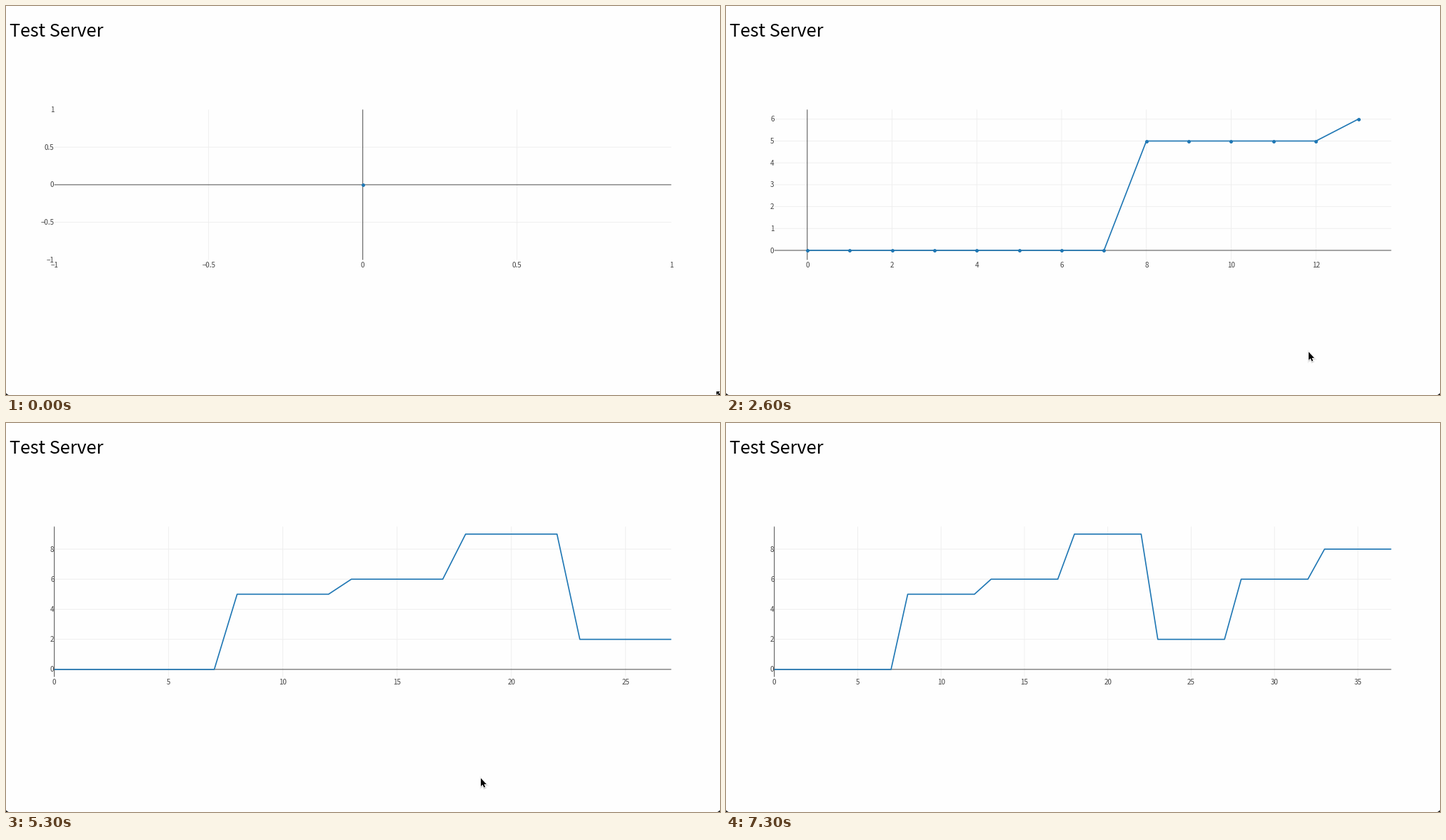
Animation of 1000x546 px, one loop 7400 ms. Source, as a matplotlib script:

```python
import math

import matplotlib.pyplot as plt
import numpy as np
from matplotlib.animation import FuncAnimation
from matplotlib.patches import Polygon

W, H, DPI = 1000, 546, 100
FRAMES, INTERVAL = 74, 100
PT = 72 / DPI
LEFT, RIGHT, TOP, BOTTOM = 67.7, 931.7, 145.4, 356.4
PAD_X, PAD_Y = 46.1, 13.4
BLUE, DARK, GRID, PAPER = "#1f77b4", "#444444", "#eeeeee", "#fefefe"
FONT = "Noto Sans CJK JP"

# The reading holds at 0 for eight samples, then changes every five.
VALUES = [0] * 8 + [v for v in (5, 6, 9, 2, 6, 8) for _ in range(5)]

# Pointer path: frame, x, y of the tip
PATH = np.array([
    (16, 989, 530), (18, 967.5, 508.5), (22, 905, 496), (26, 816, 485.5),
    (31, 668, 496.5), (36, 665.5, 496.5), (38, 665, 498.5), (62, 665, 498.5),
    (65, 662, 493), (67, 658, 475.8), (70, 656, 508),
])
ARROW = np.array([(0, 0), (0, 11.4), (2.6, 9.1), (4.4, 13.1), (6.2, 12.3),
                  (4.5, 8.5), (7.9, 8.5)])

fig = plt.figure(figsize=(W / DPI, H / DPI), dpi=DPI, facecolor=PAPER)
ax = fig.add_axes([0, 0, 1, 1])


def last_sample(frame):
    """Newest sample index: one every two frames, with a brief late spell."""
    if frame == 0:
        return 0
    return (frame + 2 - (25 <= frame <= 37)) // 2


def tick_step(span, count):
    """Smallest 2, 5 or 10 times a power of ten above span / count."""
    rough = span / count
    base = 10 ** math.floor(math.log10(rough) + 1e-9)
    return base * next(m for m in (2, 5, 10) if m > rough / base + 1e-9)


def ticks(lo, hi, count):
    step = tick_step(hi - lo, count)
    first, last = math.ceil(lo / step - 1e-6), math.floor(hi / step + 1e-6)
    return [round(k * step, 6) for k in range(first, last + 1)]


def padded(lo, hi, length, pad):
    extra = (hi - lo) * pad / (length - 2 * pad)
    return lo - extra, hi + extra


def ranges(n, markers):
    top = max(VALUES[:n + 1])
    width, height = RIGHT - LEFT, BOTTOM - TOP
    if n == 0:
        xr = (-1, 1)
    else:
        xr = padded(0, n, width, PAD_X) if markers else (0, n)
    if top == 0:
        yr = (-1, 1)
    else:
        yr = padded(0, top, height, PAD_Y if markers else height / 20)
    return xr, yr


def label(x, y, value, align):
    ax.text(x, y, f"{value:g}".replace("-", "\u2212"), family=FONT, color=DARK,
            size=9.8 * PT, ha=align, va="baseline", zorder=5)


def segment(xs, ys, color, width, z):
    ax.plot(xs, ys, color=color, lw=width * PT, zorder=z, snap=False,
            solid_capstyle="butt", solid_joinstyle="round")


def draw_chart(n):
    markers = n < 19
    (x0, x1), (y0, y1) = ranges(n, markers)

    def px(x):
        return LEFT + (x - x0) / (x1 - x0) * (RIGHT - LEFT)

    def py(y):
        return BOTTOM - (y - y0) / (y1 - y0) * (BOTTOM - TOP)

    for t in ticks(x0, x1, 10):
        if t == 0:
            segment([px(t)] * 2, [TOP, BOTTOM], DARK, 0.95, 2)
        elif x0 < t < x1:
            segment([px(t)] * 2, [TOP, BOTTOM], GRID, 0.9, 1)
        label(px(t), 367, t, "center")
    for t in ticks(y0, y1, 7.6):
        if t == 0:
            segment([LEFT, RIGHT], [py(t)] * 2, DARK, 0.95, 2)
        elif y0 < t < y1:
            segment([LEFT, RIGHT], [py(t)] * 2, GRID, 0.9, 1)
        label(67.5, py(t) + 3.6, t, "right")

    xs = [px(i) for i in range(n + 1)]
    ys = [py(v) for v in VALUES[:n + 1]]
    segment(xs, ys, BLUE, 1.65, 3)
    if markers:
        ax.plot(xs, ys, "o", color=BLUE, ms=4.9 * PT, mew=0, zorder=4)


def polygon(points, color, **style):
    ax.add_patch(Polygon(points, closed=True, fc=color, snap=False, **style))


def draw_pointer(frame):
    if frame < 16:
        polygon([(995, 541), (1000, 541), (995, 546)], "black", lw=0, zorder=8)
        segment([996, 1001], [542, 547], "black", 1.6, 8)
    elif frame <= 70:
        tip = np.array([np.interp(frame, PATH[:, 0], PATH[:, k]) for k in (1, 2)])
        for grow, alpha in ((3.2, 0.06), (1.6, 0.1)):
            polygon(ARROW + tip + (0.3, 1.2), "black", ec="black", alpha=alpha,
                    lw=grow * PT, zorder=6)
        polygon(ARROW + tip, "black", ec="white", lw=1.6 * PT, zorder=7)
        polygon(ARROW + tip, "black", lw=0, zorder=8)


def draw(frame):
    ax.clear()
    ax.set(xlim=(0, W), ylim=(H, 0))
    ax.axis("off")
    ax.text(5.3, 43, "Test Server", family=FONT, size=25.2 * PT, color="black",
            ha="left", va="baseline")
    for x, inward in ((0, 1), (W, -1)):
        polygon([(x, H - 2.5), (x + inward * 3.5, H), (x, H)], "#222222", lw=0)
    draw_chart(last_sample(frame))
    draw_pointer(frame)
    return []


anim = FuncAnimation(fig, draw, frames=FRAMES, interval=INTERVAL,
                     init_func=lambda: draw(0), repeat=True, repeat_delay=0)
plt.show()
```
